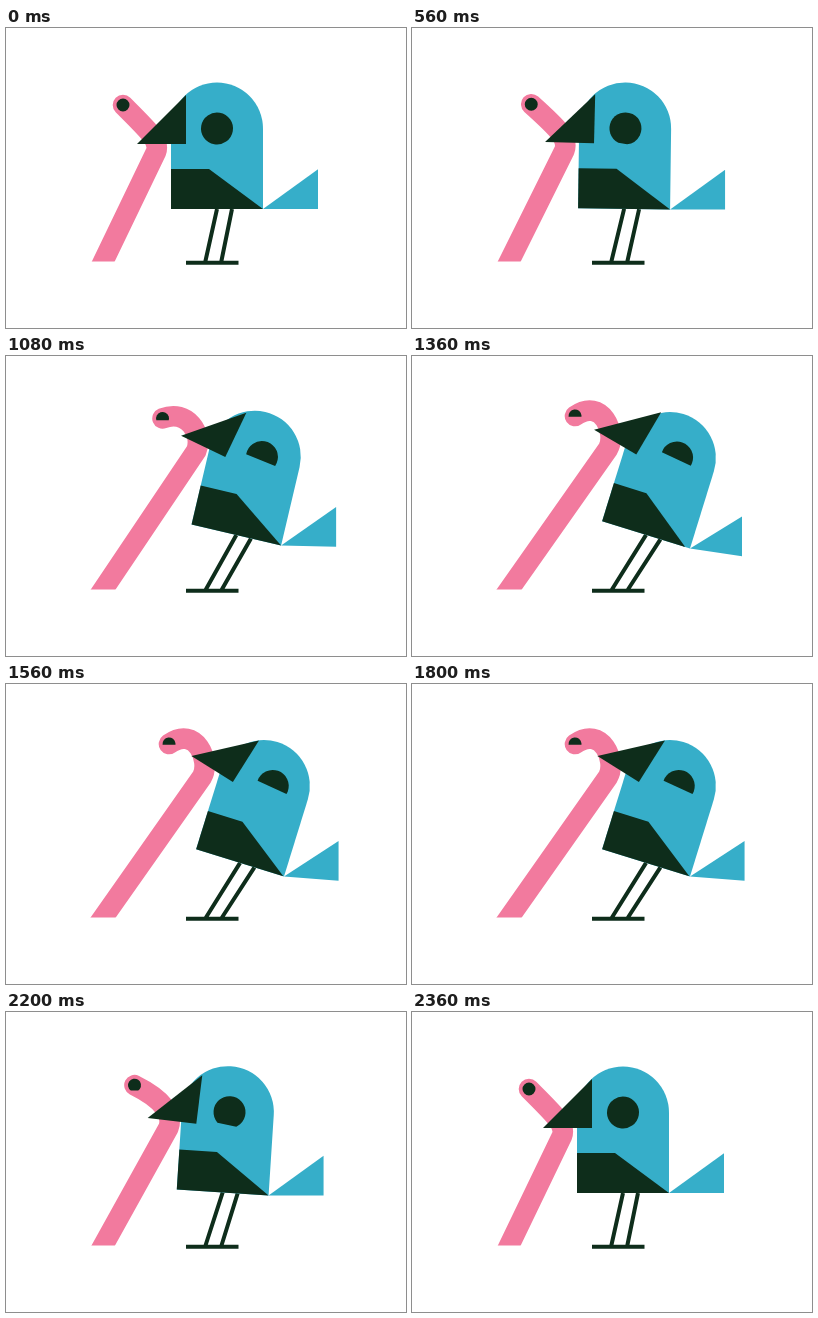
Recreate the animation shown at these times as an HTML page with a canvas. Size 400 px wide and 300 px high, loop 2840 ms.

```html
<!DOCTYPE html>
<html lang="en">
<head>
<meta charset="utf-8">
<title>Bird and worm</title>
<style>
  html, body { margin: 0; width: 100%; height: 100%; overflow: hidden; background: #fff; }
  canvas { display: block; width: 400px; height: 300px; }
</style>
</head>
<body>
<canvas id="stage" width="400" height="300"></canvas>
<script>
const ctx = document.getElementById('stage').getContext('2d');
const BLUE = '#36aec9', DARK = '#0e2d1b', PINK = '#f27a9e';
const LOOP = 2840, STEP = 40, RAD = Math.PI / 180;

// Key poses along the pull, from rest (0) to fully leaning back (1).
const STOPS = [0, 0.31, 0.775, 1];
const POSE = {
  rumpX: [257, 265, 275, 278], rumpY: [181, 184.5, 189.5, 192.5], lean: [0, 5.3, 13.1, 17.2],
  beakX: [180, 194.8, 219, 227.3], beakY: [116, 110, 101, 98], beakTurn: [0, 10, 25.2, 32.5],
  eyeX: [211, 229, 255.5, 267], eyeY: [100.5, 100, 101, 102],
  lid: [16, 11.4, 3.4, 1.6], lidTurn: [10, 13, 22, 25],
  kneeX: [150, 168, 190, 196], kneeY: [124, 112, 95, 93],
  neckX: [154, 173, 197, 205], neckY: [113, 98, 78, 77],
  napeX: [145, 163, 181, 190], napeY: [105, 80, 53, 41],
  headX: [117, 133.5, 156.3, 163], headY: [77, 71.5, 62.5, 60],
  wormLid: [7, 4.6, 2, 0.8]
};

const clamp = x => Math.min(1, Math.max(0, x));
const sine = x => (1 - Math.cos(Math.PI * x)) / 2;

function pullAt(t) {
  if (t > 1840) return 1 - sine(clamp((t - 1840) / 520));
  const x = clamp((t - 520) / 740);
  return x * 0.75 + sine(x) * 0.25;
}

// Two short tugs while the worm is at full stretch.
const tugAt = t => t > 1200 && t < 1840 ? Math.sin(Math.PI * (t - 1200) / 320) ** 2 : 0;

function poseAt(pull) {
  const i = Math.max(1, STOPS.findIndex(s => pull <= s));
  const k = (pull - STOPS[i - 1]) / (STOPS[i] - STOPS[i - 1]);
  const pose = {};
  for (const name in POSE) {
    const [a, b] = POSE[name].slice(i - 1, i + 1);
    pose[name] = a + (b - a) * k;
  }
  return pose;
}

function polygon(color, ...points) {
  ctx.fillStyle = color;
  ctx.beginPath();
  points.forEach(p => ctx.lineTo(...p));
  ctx.fill();
}

function placed(x, y, degrees, paint) {
  ctx.save();
  ctx.translate(x, y);
  ctx.rotate(degrees * RAD);
  paint();
  ctx.restore();
}

// A disc whose lower part is hidden below the lid line.
function eye(x, y, radius, lid, turn) {
  const a = Math.asin(clamp(lid / radius));
  placed(x, y, turn, () => {
    ctx.fillStyle = DARK;
    ctx.beginPath();
    ctx.arc(0, 0, radius, Math.PI - a, a);
    if (lid >= radius) ctx.arc(0, 0, radius, 0, 2 * Math.PI);
    ctx.fill();
  });
}

function worm(p) {
  ctx.save();
  ctx.beginPath();
  ctx.rect(0, 0, 400, 233.5);
  ctx.clip();
  ctx.strokeStyle = PINK;
  ctx.lineWidth = 20.6;
  ctx.lineCap = ctx.lineJoin = 'round';
  ctx.beginPath();
  const slope = (p.kneeX - 97.5) / (233 - p.kneeY);
  ctx.moveTo(97.5 - 20 * slope, 253);
  ctx.lineTo(p.kneeX, p.kneeY);
  ctx.bezierCurveTo(p.neckX, p.neckY, p.napeX, p.napeY, p.headX, p.headY);
  ctx.stroke();
  ctx.restore();
  eye(p.headX, p.headY, 6.5, p.wormLid, 0);
}

function legs(p) {
  const c = Math.cos(p.lean * RAD), s = Math.sin(p.lean * RAD);
  ctx.strokeStyle = DARK;
  ctx.lineWidth = 4;
  ctx.lineCap = 'butt';
  ctx.beginPath();
  for (const [foot, hip] of [[199, -46], [215, -31]]) {
    ctx.moveTo(foot, 235);
    ctx.lineTo(p.rumpX + hip * c, p.rumpY + hip * s);
  }
  ctx.moveTo(180, 234.7);
  ctx.lineTo(232.5, 234.7);
  ctx.stroke();
}

function bird(p, pull, tug) {
  const tailWidth = 55 - 3 * tug;
  const drop = 3 * pull ** 6 + 4.2 * tug + 0.6 * pull;
  placed(p.rumpX, p.rumpY, 0, () =>
    polygon(BLUE, [0, 0], [tailWidth, drop - 39.7], [tailWidth, drop]));
  placed(p.rumpX, p.rumpY, p.lean, () => {
    ctx.fillStyle = BLUE;
    ctx.beginPath();
    ctx.moveTo(-92, 0);
    ctx.arc(-46, -80.5, 46, Math.PI, 0);
    ctx.lineTo(0, 0);
    ctx.fill();
    polygon(DARK, [-92, 0], [-92, -40], [-54 - 1.5 * pull - 2.5 * tug, -40], [-5 * tug, 0]);
  });
  eye(p.eyeX - 2 * tug, p.eyeY - 0.5 * tug, 16, p.lid, p.lidTurn);
  placed(p.beakX - 3 * tug, p.beakY + 0.5 * tug, p.beakTurn - 2 * tug, () =>
    polygon(DARK, [0, 0], [0, -49], [-49, 0]));
}

function draw(now) {
  const t = Math.floor(now % LOOP / STEP) * STEP;
  const pull = pullAt(t), pose = poseAt(pull);
  ctx.fillStyle = '#fff';
  ctx.fillRect(0, 0, 400, 300);
  worm(pose);
  legs(pose);
  bird(pose, pull, tugAt(t));
}

let start;
function tick(now) {
  start ??= now;
  draw(now - start);
  requestAnimationFrame(tick);
}
requestAnimationFrame(tick);
</script>
</body>
</html>
```
